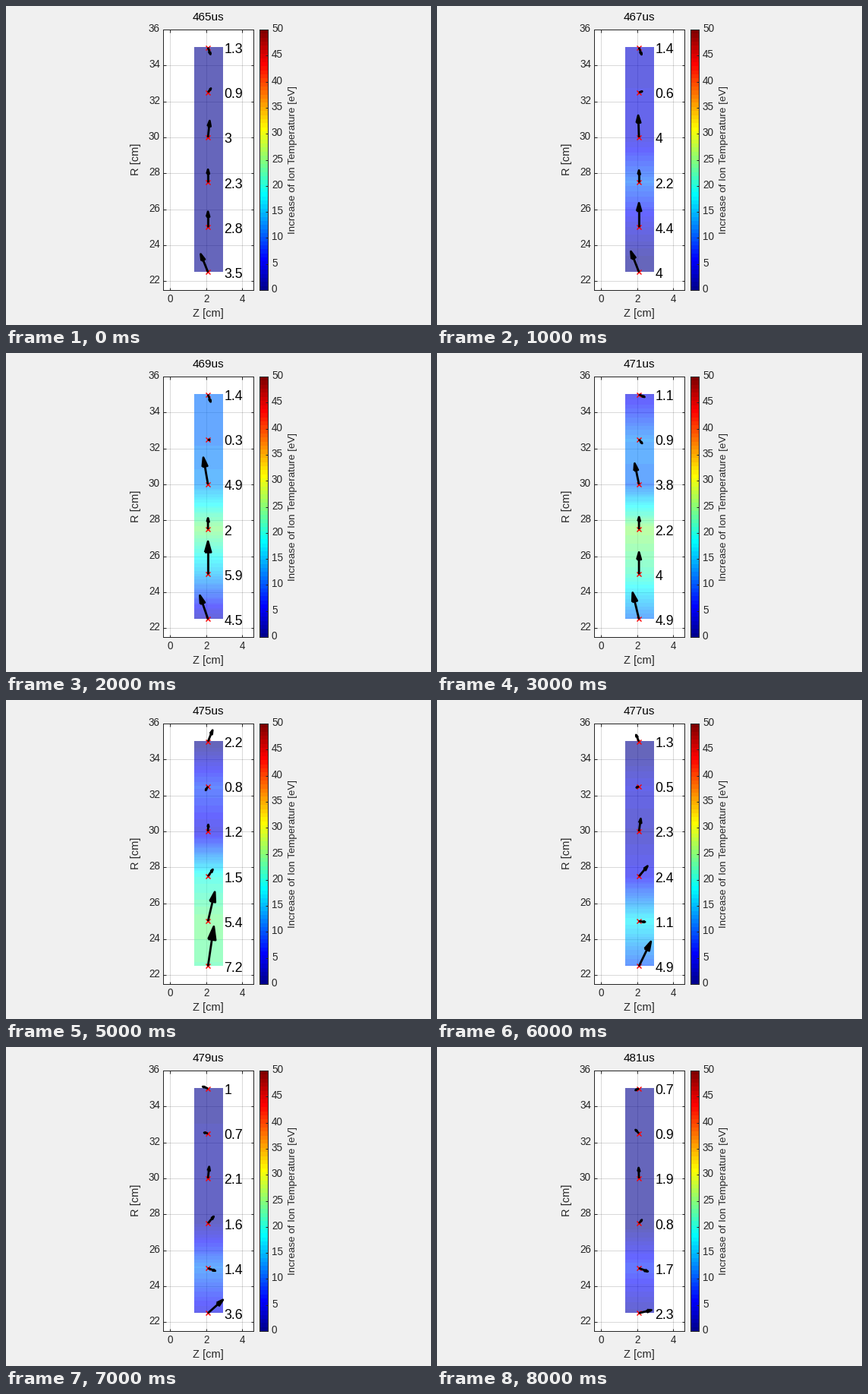
These frames come from a looping animation (560 by 420 pixels, 9000 ms). A matplotlib script:

```python
import numpy as np
import matplotlib.pyplot as plt
from matplotlib.animation import FuncAnimation
from matplotlib.collections import LineCollection
from matplotlib.colors import ListedColormap

plt.rcParams["font.family"] = "Liberation Sans"
W, H, DPI = 560, 420, 100
PT = 72 / DPI  # points per pixel
INK = "#262626"
FLOW_SCALE = 0.309  # cm of arrow per unit of flow
START, STEP, SHOTS = 465, 2, 9

Z0 = 2.1
R = np.linspace(22.5, 35, 6)
ROWS = np.linspace(R[0], R[-1], 126)

# flow speed readings at a few times, innermost radius first
READINGS = {
    465: (3.5, 2.8, 2.3, 3.0, 0.9, 1.3),
    469: (4.5, 5.9, 2.0, 4.9, 0.3, 1.4),
    473: (5.3, 2.0, 2.4, 2.8, 1.5, 0.8),
    475: (7.2, 5.4, 1.5, 1.2, 0.8, 2.2),
    477: (4.9, 1.1, 2.4, 2.3, 0.5, 1.3),
    481: (2.3, 1.7, 0.8, 1.9, 0.9, 0.7),
}


def speed(t):
    return np.array([np.interp(t, list(READINGS), row)
                     for row in zip(*READINGS.values())])


def step(t, mid):
    return 1 / (1 + np.exp(-2 * (t - mid)))


def angle(t):
    """Flow direction per radius: tilts, late flips, a sway and slow spins."""
    d = t - START
    return np.radians([
        112 - 0.096 * d ** 2.5,
        90 - 110 * step(t, 476),
        90 - 40 * step(t, 474),
        92 + 10 * np.sin(2 * np.pi * (d - 2) / 14),
        54 - 17.5 * d,
        -70 + 23 * max(0, d - 4),
    ])


def pulse(t, peak, rise, fall, height):
    return height / (1 + ((t - peak) / (rise if t < peak else fall)) ** 2)


def temperature(t):
    """Heating pulse per radius after a common onset."""
    onset = min(1, (t - START) / 4)
    return onset * np.array([
        pulse(t, 473, 1.5, 2.7, 38),
        pulse(t, 473.5, 5.6, 5.5, 28),
        pulse(t, 474, 25, 1.8, 28),
        pulse(t, 469, 4, 5, 15),
        pulse(t, 473, 12, 3.3, 15),
        pulse(t, 469, 4, 2, 13),
    ]) - 2


def jet64():
    x = np.arange(1, 65) / 64
    rgb = [np.clip(1.5 - abs(4 * x - c), 0, 1) for c in (3, 2, 1)]
    return ListedColormap(np.column_stack(rgb))


def arrow(x, y, u, v):
    """A shaft and a closed triangular head."""
    a, b = 0.33, 0.28
    tip = (x + u, y + v)
    left = (x + u - a * (u + b * v), y + v - a * (v - b * u))
    right = (x + u - a * (u - b * v), y + v - a * (v + b * u))
    return [[(x, y), (x + 0.9 * u, y + 0.9 * v)], [left, tip, right, left]]


fig = plt.figure(figsize=(W / DPI, H / DPI), dpi=DPI, facecolor="#f0f0f0")


def panel(x, y, w, h):
    ax = fig.add_axes([x / W, 1 - (y + h) / H, w / W, h / H])
    for side in ax.spines.values():
        side.set(linewidth=PT, color=INK)
    ax.tick_params(direction="in", length=3.5 * PT, width=PT, color=INK,
                   labelleft=False, labelbottom=False)
    return ax


def label(x, y, s, size, ha="center", color=INK, rotation=0):
    return fig.text(x / W, 1 - y / H, s, fontsize=size * PT, ha=ha, color=color,
                    va="baseline", rotation=rotation, rotation_mode="anchor")


TOP, HEIGHT = 31, 343


def row_y(r):
    return TOP + (36 - r) * HEIGHT / 14.5


ax = panel(207, TOP, 119, HEIGHT)
ax.set(xticks=range(0, 5, 2), yticks=range(22, 37, 2))
ax.tick_params(top=True, right=True)
ax.set_axisbelow(True)
ax.grid(color="black", alpha=0.15, linewidth=PT)

cmap = jet64()
strip = ax.imshow(np.zeros((len(ROWS), 1)), cmap=cmap, vmin=0, vmax=50, alpha=0.6,
                  extent=(1.32, 2.91, R[0], R[-1]), origin="lower",
                  aspect="auto", interpolation="nearest", zorder=1)
ax.set(xlim=(-0.4, 4.63), ylim=(21.5, 36))
ax.plot(np.full(6, Z0), R, "x", color="red", markersize=5.5 * PT,
        markeredgewidth=1.4 * PT, zorder=3)
arrows = ax.add_collection(LineCollection(
    [], colors="black", facecolors="black", linewidths=2.8 * PT,
    zorder=4, clip_on=False))

bar = panel(334, TOP, 11, HEIGHT)
bar.imshow(np.arange(64)[:, None], cmap=cmap, extent=(0, 1, 0, 50),
           origin="lower", aspect="auto", interpolation="nearest")
bar.set(xticks=[], yticks=range(0, 51, 5))
bar.tick_params(left=False, right=True)

for r in range(22, 37, 2):
    label(203, row_y(r) + 3, str(r), 13.5, "right")
for z in range(0, 5, 2):
    label(216.7 + z * 23.66, 389.5, str(z), 13.5)
for e in range(0, 51, 5):
    label(350, TOP + (50 - e) * HEIGHT / 50 + 3, str(e), 13.5, "left")
label(266.5, 409.5, "Z [cm]", 14.67)
label(175, 202, "R [cm]", 14.67, rotation=90)
label(381, 202, "Increase of Ion Temperature [eV]", 13.33, rotation=90)

title = label(266.5, 19, "", 15.2, color="black")
speeds = [label(287.5, row_y(r) + 7.5, "", 17.8, "left", "black") for r in R]


def update(i):
    t = START + STEP * i
    s, a = speed(t), angle(t)
    title.set_text(f"{t}us")
    strip.set_data(np.interp(ROWS, R, temperature(t))[:, None])
    segments = []
    for r, length, turn, text in zip(R, s, a, speeds):
        reach = length * FLOW_SCALE
        segments += arrow(Z0, r, reach * np.cos(turn), reach * np.sin(turn))
        text.set_text(f"{round(length, 1):g}")
    arrows.set_segments(segments)
    return [title, strip, arrows, *speeds]


anim = FuncAnimation(fig, update, frames=SHOTS, interval=1000, repeat=True,
                     repeat_delay=0, blit=False)
plt.show()
```
